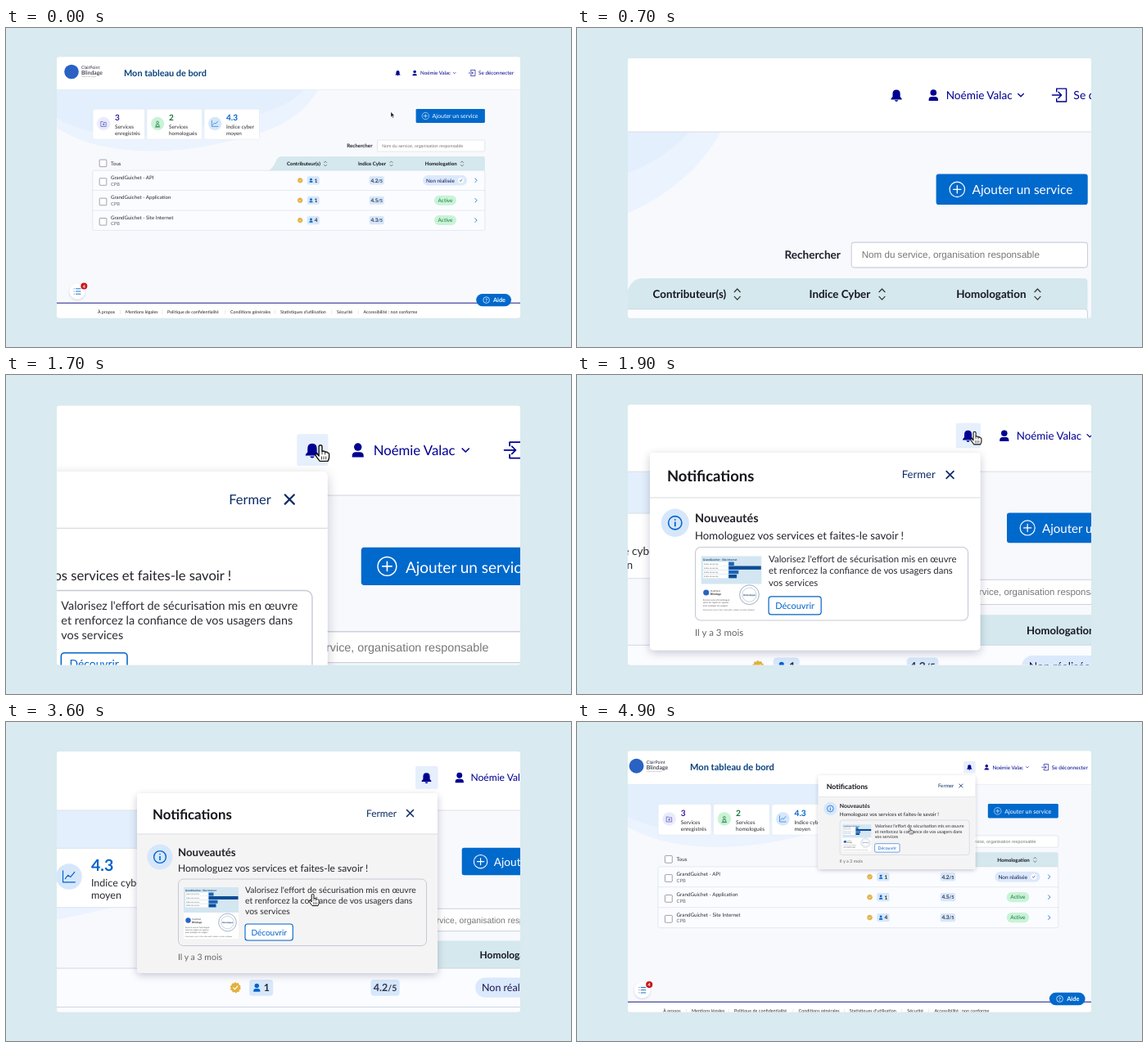
Animation of 690 by 390 pixels, one loop 5 s. Source, as an HTML page:

```html
<!DOCTYPE html>
<html lang="fr">
<head>
<meta charset="utf-8">
<title>Mon tableau de bord</title>
<style>
  html, body { margin: 0; width: 100%; height: 100%; overflow: hidden; background: #d9eaf0; }
  svg { display: block; width: 690px; height: 390px; }
  text { font-family: Lato, "Open Sans", sans-serif; text-rendering: geometricPrecision; white-space: pre; }
  .field { font-family: "Liberation Sans", Arial, sans-serif; }
</style>
</head>
<body>
<svg id="stage" viewBox="0 0 690 390" xmlns="http://www.w3.org/2000/svg"></svg>
<script>
const NAVY = '#000091', BLUE = '#0069cc', INK = '#2b2b33', PALE = '#d6e7fb';

// Drawing helpers
const text = (x, y, s, size, fill = INK, weight = 400, more = '') =>
  `<text x="${x}" y="${y}" font-size="${size}" fill="${fill}" font-weight="${weight}" ${more}>${s}</text>`;
const mid = 'text-anchor="middle"';
const box = (x, y, w, h, fill, r = 0, more = '') =>
  `<rect x="${x}" y="${y}" width="${w}" height="${h}" rx="${r}" fill="${fill}" ${more}/>`;
const dot = (x, y, r, fill, more = '') => `<circle cx="${x}" cy="${y}" r="${r}" fill="${fill}" ${more}/>`;
const shape = (d, fill, more = '') => `<path d="${d}" fill="${fill}" ${more}/>`;
const line = (d, color, w) =>
  `<path d="${d}" fill="none" stroke="${color}" stroke-width="${w}" stroke-linecap="round" stroke-linejoin="round"/>`;
const edge = (color, w) => `stroke="${color}" stroke-width="${w}"`;
const person = (x, y, k, fill) =>
  `<g transform="translate(${x} ${y}) scale(${k})">${dot(0, -1.4, 1.75, fill)}${shape('M-2.6 3.2v-.6q0-1.7 1.7-1.7h1.8q1.7 0 1.7 1.7v.6z', fill)}</g>`;

function header() {
  return box(0, 0, 690, 75.4, '#fff') + box(0, 75.2, 690, .5, '#dfe1e8') +
    dot(80, 53.5, 8.8, '#2a62c4') +
    text(92, 50.4, 'ClairPoint', 5.2, '#25253a') +
    text(92, 57.2, 'Blindage', 6.8, '#25253a', 500) +
    text(92.5, 60.4, "L'outil de suivi en ligne", 1.8, '#777') +
    text(144, 58.8, 'Mon tableau de bord', 10.9, '#08427c', 700) +
    `<rect id="bellBox" x="471.6" y="47.8" width="14.1" height="14.2" rx=".8"/>` +
    shape('M478.5 52q2.1 0 2.1 2.3v1.6l.9 1.1v.5h-6v-.5l.9-1.1v-1.6q0-2.3 2.1-2.3zM477.5 57.8h2q-.2.8-1 .8t-1-.8z', NAVY) +
    person(499.1, 55, 1, NAVY) +
    text(506.1, 57.3, 'Noémie Valac', 6.2, NAVY) +
    line('M546.2 54.3l1.5 1.5 1.5-1.5', NAVY, .6) +
    line('M567.6 53v-1.6h5.4v7.2h-5.4V57M565.2 55h5M568.6 53.3l1.7 1.7-1.7 1.7', NAVY, .65) +
    text(577, 57.3, 'Se déconnecter', 6.35, NAVY);
}

function tiles() {
  const data = [
    [106, 63.5, '3', '#3d1a9e', '#e9ebfd', 'Services', 'enregistrés'],
    [172, 67.5, '2', '#18753c', '#c9f3d7', 'Services', 'homologués'],
    [242, 67.5, '4.3', '#0063cb', PALE, 'Indice cyber', 'moyen']];
  const icons = [
    line('M116.2 114.5h2l.8.9h3.2v5h-6zM118.2 117.8h2M119.2 116.8v2', '#3d3ab0', .6),
    line('M183.3 120.2v-2.2h3.6v2.2zM182.3 121h5.6', '#18753c', .7) + dot(185.1, 115.4, 1.4, 'none', edge('#18753c', .7)),
    line('M251.4 113.2v7.2h7.6M252.8 118.2l1.8-2.2 1.5 1.2 2.6-3.2', '#0063cb', .6)];
  return data.map(([x, w, n, color, tint, a, b], i) => {
    const tx = x + 27;
    return box(x, 99.2, w, 37, '#fff', 2, edge('#dde4ee', .5)) + dot(x + 13.2, 116.9, 8.1, tint) + icons[i] +
      text(tx, 113.3, n, 10, color, 700) + text(tx, 123, a, 6.4) + text(tx, 130.7, b, 6.4);
  }).join('');
}

function tools() {
  return box(500.6, 98.9, 84.3, 17.1, BLUE, 1.4) +
    dot(512.3, 107.5, 4.2, 'none', edge('#fff', .55)) + line('M510.2 107.5h4.2M512.3 105.4v4.2', '#fff', .6) +
    text(520.6, 110.3, 'Ajouter un service', 7.02, '#fff') +
    text(416.3, 146, 'Rechercher', 6.2, '#1e1e2a', 700) +
    box(453.5, 137, 131.3, 14, '#fff', 1.6, edge('#ccd0db', .5)) +
    text(459.2, 145.8, 'Nom du service, organisation responsable', 5.3, '#777', 400, 'class="field"');
}

function row(i, name, people, score, done) {
  const y = 186.3 + 24.4 * i;
  const state = done
    ? box(523, y - 6, 27, 12, '#c9f3d7', 6) + text(536.5, y + 2.2, 'Active', 6.4, '#18753c', 400, mid)
    : box(509, y - 6.2, 54, 12.4, '#dbe9fc', 6.2) + text(513, y + 2.2, 'Non réalisée', 6.4, '#16164f') +
      dot(555.5, y, 3.4, '#fff') + line(`M554.2 ${y + .2}l.9 1 1.7-2.3`, '#16164f', .6);
  return check(y + 1.7) + text(128, y - 1.4, name, 6.15) + text(128, y + 6.3, 'CPB', 5.7, '#666') +
    dot(359.2, y, 2.9, '#e2b03f', `stroke="#e2b03f" stroke-width=".8" stroke-dasharray="1.1 .7"`) +
    line(`M357.9 ${y + .1}l.9 1 1.7-2`, '#fff', .6) +
    box(367.8, y - 5, 14.9, 10.1, PALE, 2) + person(372.5, y, .8, '#0063cb') + text(376.8, y + 2.3, people, 6.3, INK, 700) +
    box(443.7, y - 5, 18, 10.1, PALE, 2) +
    text(452.7, y + 2.2, score + '<tspan font-size="5.4">/5</tspan>', 6.4, '#33364f', 700, mid) +
    state + line(`M572.9 ${y - 2.3}l2.2 2.3-2.2 2.3`, '#0063cb', .8);
}

function check(y) { return box(114.2, y - 4.3, 8.6, 8.6, '#fff', .8, edge('#5a5a66', .55)); }

function table() {
  const sort = x => line(`M${x - 1.6} 164.6l1.6-1.7 1.6 1.7M${x - 1.6} 167.2l1.6 1.7 1.6-1.7`, '#333', .55);
  const heads = [[343, 'Contributeur(s)', 390], [430, 'Indice Cyber', 470.5], [511.8, 'Homologation', 557]];
  return shape('M321 174.2q4-2 7-8l2-4.5q2.5-4.7 7-4.7h245.800q2 0 2 2v15.2z', '#d4e8ed') +
    check(165.3) + text(128, 167.7, 'Tous', 6.2) +
    heads.map(([x, s, ix]) => text(x, 168, s, 6.1, '#161620', 700) + sort(ix)).join('') +
    box(105.8, 174.2, 479, 73.2, '#fbfcff', 1.5, edge('#cdd5e2', .5)) +
    line('M105.8 198.5h479M105.8 223h479', '#cdd5e2', .5) +
    row(0, 'GrandGuichet - API', '1', '4.2', false) +
    row(1, 'GrandGuichet - Application', '1', '4.5', true) +
    row(2, 'GrandGuichet - Site Internet', '4', '4.3', true);
}

function footer() {
  const links = [[112, 'À propos'], [146, 'Mentions légales'], [197, 'Politique de confidentialité'],
    [274, 'Conditions générales'], [335, "Statistiques d'utilisation"], [404, 'Sécurité'],
    [436.5, 'Accessibilité : non conforme']];
  return box(0, 336, 690, 60, '#fff') + box(0, 335.7, 690, 1, '#1c1c86') +
    links.map(([x, s], i) => text(x, 349, s, 5.35, '#222') + (i ? box(x - 6.6, 344.5, .4, 5.5, '#ccc') : '')).join('') +
    dot(87, 322, 9.6, '#fff', 'filter="url(#soft)"') +
    line('M85.5 318.8h5.5M85.5 322h5.5M85.5 325.2h5.5M83.2 318.8h.1M83.2 322h.1M83.2 325.2h.1', '#0063cb', .9) +
    dot(95.3, 315.5, 4, '#c9191e') + text(95.3, 317.5, '4', 5.4, '#fff', 700, mid) +
    box(574.2, 325, 42.8, 15.2, BLUE, 7.6) +
    dot(586.6, 332.6, 3.8, 'none', edge('#fff', .7)) + text(586.6, 334.7, '?', 5.8, '#fff', 700, mid) +
    text(595, 335.3, 'Aide', 7.3, '#fff', 700);
}

function thumb() {
  const bars = [[208.5, 6], [213, 36], [217.8, 11], [222.5, 9]];
  return box(217, 202, 67, 63, '#fff') + box(217, 202, 67, 31, '#d3e6f1') +
    text(219, 207, 'GrandGuichet - Site Internet', 3, '#123a6b', 700) +
    bars.map(([y, w], i) => box(219, y, 28, 4, '#fff') + text(220, y + 2.8, 'Indice du service', 2.2, '#555') +
      box(247.5, y, w, 4, i % 2 ? '#0d4c96' : '#1b66b8')).join('') +
    dot(222.5, 242.5, 3.2, '#2a62c4') + text(227, 242, 'ClairPoint', 2.6, '#333') + text(227, 245.5, 'Blindage', 3.2, '#333', 700) +
    ['Service suivi et homologué', 'selon les règles en vigueur', 'pour protéger les usagers'].map((s, i) =>
      text(219, 251.5 + i * 3.2, s, 2.5, '#555')).join('') +
    text(219, 262.5, 'Document remis à titre informatif, valable à la date indiquée', 2.2, '#666') +
    dot(270.5, 245, 10.8, '#fff', edge('#8fa3bd', .8)) + dot(270.5, 245, 7.8, 'none', edge('#aab9cc', .6)) +
    text(270.5, 246.3, 'Homologué', 2.6, '#123a6b', 700, mid);
}

function panel() {
  return box(160, 87, 367, 219.5, '#fff', 4, 'filter="url(#drop)"') +
    shape('M160 137h367v165.5q0 4-4 4H164q-4 0-4-4z', '#f4f4f5', 'id="hover"') +
    box(160, 136.5, 367, 1, '#dcdde2') +
    text(179, 119, 'Notifications', 16.8, '#14141c', 700) +
    text(440, 115.5, 'Fermer', 11.9, '#0c2c66') +
    line('M489.5 107.5l8 8M497.5 107.5l-8 8', '#0c2c66', 1.6) +
    dot(188, 165, 15.6, PALE) + dot(188, 165, 7.4, 'none', edge('#0063cb', 1.4)) +
    line('M188 164.5v4M188 161.5v.1', '#0063cb', 1.6) +
    text(210, 164, 'Nouveautés', 13.2, '#22222a', 700) +
    text(210, 183, 'Homologuez vos services et faites-le savoir !', 12, '#22222a') +
    box(210.5, 192, 303, 81.5, 'none', 6, edge('#c6c9d4', 1)) + thumb() +
    text(292, 209, "Valorisez l'effort de sécurisation mis en œuvre", 10.4) +
    text(292, 222, 'et renforcez la confiance de vos usagers dans', 10.4) +
    text(292, 235, 'vos services', 10.4) +
    box(292, 247, 58.3, 20, '#fff', 3, edge('#0063cb', 1.1)) +
    text(321.2, 260.6, 'Découvrir', 10, '#0063cb', 400, mid) +
    text(210, 291, 'Il y a 3 mois', 10.5, '#666');
}

function cursors() {
  const ink = `${edge('#111', 1)} stroke-linejoin="round"`;
  return shape('M0 0v12.5l2.8-2.6 2 4.6 2-.9-2-4.5h3.7z', '#111', 'id="arrow" stroke="#fff" stroke-width=".8"') +
    `<g id="hand">` +
    shape('M-1.4 8V1.2a1.4 1.4 0 0 1 2.8 0V5.2q2.2-.5 2.6.6 2-.3 2.3.8 1.2-.1 1.3 1v2.9q-.2 2-1.2 3.5H-.6Q-2.6 11.6-4.6 8.6q.6-1.6 2-.6l1.2 1.4z', '#fff', ink) +
    line('M1.4 5.2v2.6M4 5.8v2.2M1 10v2.2M2.9 10v2.2M4.8 10v2.2', '#111', .6) + '</g>';
}

const $ = id => document.getElementById(id);
// The panel and pointers are laid out at the second zoom level.
const K = 1.955, inner = `translate(${478.5 - 513.5 / K} ${55 - 68 / K}) scale(${1 / K})`;

$('stage').innerHTML =
  `<defs><clipPath id="frame"><rect id="clip" x="62" width="566" rx="3"/></clipPath>
   <filter id="drop" x="-10%" y="-10%" width="120%" height="125%"><feDropShadow dx="0" dy="3" stdDeviation="5" flood-color="#000a3a" flood-opacity=".22"/></filter>
   <filter id="soft" x="-40%" y="-40%" width="180%" height="180%"><feDropShadow dx="0" dy="1" stdDeviation="1.3" flood-color="#000a3a" flood-opacity=".2"/></filter></defs>` +
  box(0, 0, 690, 390, '#d9eaf0') +
  `<g clip-path="url(#frame)"><g id="cam">` +
  box(0, 0, 690, 400, '#f8f9fd') +
  shape('M0 75H381C363 109 325 128 270 139C200 156 115 157 62 122L0 90z', '#ebf3fe') +
  shape('M0 75H364C350 90 335 99 300 107C220 126 130 150 62 110L0 90z', '#e3effd') +
  header() + tiles() + tools() + table() + footer() +
  `<g transform="${inner}"><g id="panel">${panel()}</g>${cursors()}</g></g></g>`;

const LOOP = 5000, STEP = 100;
const inOut = u => u < .5 ? (2 * u) ** 2.2 / 2 : 1 - (2 - 2 * u) ** 2.2 / 2;
const sine = u => (1 - Math.cos(Math.PI * u)) / 2;
const out = u => 1 - (1 - u) ** 3.5;

// time, [zoom, bell x, bell y], easing into this stop
const camera = [
  [0, [1, 478.5, 55]],
  [1200, [2.9, 338, 98], sine],
  [1500, [2.9, 338, 98], sine],
  [2100, [K, 513.5, 68], inOut],
  [4700, [K, 513.5, 68], sine],
  [5000, [1, 478.5, 55], out]];
const pointer = [
  [0, [496.9, 160.9]],
  [100, [496.9, 160.9], sine],
  [900, [520.8, 63.8], sine],
  [2700, [520.8, 63.8], sine],
  [3300, [311, 241], inOut],
  [3600, [374.6, 210.6], inOut],
  [5000, [374.6, 210.6], sine]];

function at(track, t) {
  const i = track.findIndex(k => k[0] > t), [t0, a] = track[i - 1], [t1, b, ease] = track[i];
  const u = ease((t - t0) / (t1 - t0));
  return a.map((v, n) => v + (b[n] - v) * u);
}

const show = (id, on) => $(id).setAttribute('visibility', on ? 'inherit' : 'hidden');

function draw(time) {
  const t = Math.floor((time % LOOP) / STEP) * STEP;
  const [s, bx, by] = at(camera, t), [px, py] = at(pointer, t);
  $('cam').setAttribute('transform', `translate(${bx - 478.5 * s} ${by - 55 * s}) scale(${s})`);
  const top = 35.5 + (by - 55) * .058;
  $('clip').setAttribute('y', top);
  $('clip').setAttribute('height', 354.5 - top);
  for (const id of ['arrow', 'hand']) $(id).setAttribute('transform', `translate(${px} ${py})`);
  const open = t >= 1600;
  show('arrow', t < 600);
  show('hand', t >= 900);
  show('panel', open);
  show('hover', open && py > 137);
  show('bellBox', t >= 900);
  $('bellBox').setAttribute('fill', open ? '#e6effc' : '#f3f3f5');
}

const start = performance.now();
function tick() {
  draw(Math.max(0, performance.now() - start));
  requestAnimationFrame(tick);
}
tick();
</script>
</body>
</html>
```
